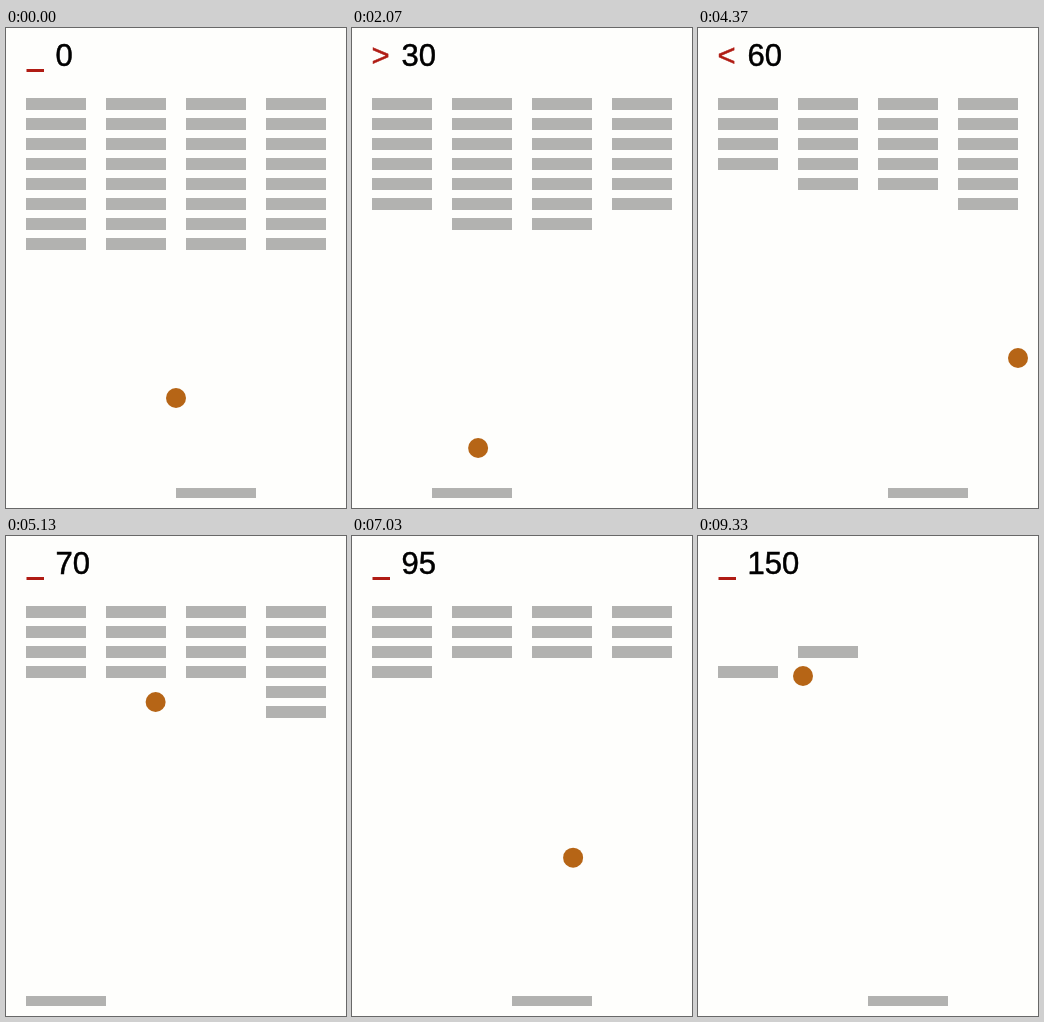
An HTML page with a canvas for the animation above (9.36 s loop, 340 by 480 pixels).

```html
<!DOCTYPE html>
<html lang="en">
<head>
<meta charset="utf-8">
<title>Brick game</title>
<style>
  html, body { margin: 0; width: 100%; height: 100%; overflow: hidden; background: #fefefc; }
  canvas { display: block; }
</style>
</head>
<body>
<canvas id="stage" width="340" height="480"></canvas>
<script>
const LOOP = 9360, FPS = 30, FRAMES = 281;
const FLOOR = 450, TOP = 20, COLS = 4, ROWS = 8;
const ctx = document.getElementById('stage').getContext('2d');

// Each rally: its frames, then the points where the ball turns (y defaults to the paddle).
const rallies = [
  [0, 37, [[170, 370], [210], [285, 225], [270], [50, 225], [300], [20, 285]]],
  [37, 87, [[20, 285], [88, 210], [160], [252, 210], [120], [175, 180], [190], [66, 180], [102, 225]]],
  [87, 131, [[102, 225], [140], [150, 180], [150], [60, 165], [260], [320, 330]]],
  [131, 176, [[320, 330], [215, 165], [130], [150, 165], [40], [130, 150], [40, 270]]],
  [176, 247, [[40, 270], [170], [285, 180], [270], [251, 140], [200], [275, TOP],
    [240, 64], [212, TOP], [186, 84], [160, TOP], [137, 64], [113, TOP], [86, 64],
    [62, TOP], [40, 84], [30, TOP], [70, 104], [104, TOP]]],
  [247, 280, [[104, TOP], [130, 84], [155, TOP], [195, 104], [230, TOP], [130], [105, 140]]]
];

// Vertical speed is constant within a rally, so times follow from the heights.
const path = [];
for (const [start, end, pts] of rallies) {
  const turns = pts.map(([x, y = FLOOR]) => ({ x, y, dist: 0 }));
  for (let i = 1; i < turns.length; i++) {
    turns[i].dist = turns[i - 1].dist + Math.abs(turns[i].y - turns[i - 1].y);
  }
  const speed = (end - start) / turns[turns.length - 1].dist;
  for (const { x, y, dist } of turns) path.push({ n: start + dist * speed, x, y });
}
const landings = path.filter(p => p.y === FLOOR);

function ballAt(n) {
  const i = Math.max(1, path.findIndex(p => p.n > n));
  const a = path[i - 1], b = path[i];
  if (n >= path[path.length - 1].n) return path[path.length - 1];
  const k = (n - a.n) / (b.n - a.n);
  return { x: a.x + (b.x - a.x) * k, y: a.y + (b.y - a.y) * k };
}

// The ball is as wide as the gaps, so it always touches exactly one column.
const brickY = row => 70 + row * 20;
const goneAt = Array.from({ length: COLS }, () => Array(ROWS).fill(Infinity));
for (let n = 0; n < FRAMES - 1; n += 0.02) {
  const { x, y } = ballAt(n);
  const col = goneAt[Math.min(COLS - 1, Math.floor((x - 10) / 80))];
  for (let r = 0; r < ROWS; r++) {
    if (Math.abs(y - brickY(r) - 6) < 16) col[r] = Math.min(col[r], n);
  }
}

// While the ball is below the bricks, the paddle heads for the next landing.
const paddle = [];
for (let n = 0, x = 170; n < FRAMES; n++) {
  const gap = (landings.find(p => p.n > n) || landings[0]).x - 40 - x;
  const dir = ballAt(n).y > 200 && Math.abs(gap) >= 10 ? Math.sign(gap) : 0;
  paddle.push({ x, dir });
  x += 10 * dir;
}

function label(text, x, color) {
  ctx.fillStyle = ctx.strokeStyle = color;
  ctx.fillText(text, x, 38);
  ctx.strokeText(text, x, 38);
}

function draw(n) {
  ctx.fillStyle = '#fefefc';
  ctx.fillRect(0, 0, 340, 480);

  ctx.fillStyle = '#b2b2b0';
  let score = 0;
  goneAt.forEach((col, c) => col.forEach((gone, r) => {
    if (gone <= n) score += 5;
    else ctx.fillRect(20 + c * 80, brickY(r), 60, 12);
  }));

  const { x, dir } = paddle[n];
  ctx.fillRect(x, 460, 80, 10);

  ctx.font = '31px "Liberation Sans", Arial, sans-serif';
  ctx.lineWidth = 0.5;
  label(score, 49.5, '#000');
  if (dir) {
    label(dir < 0 ? '<' : '>', 19.5, '#b01c14');
  } else {
    ctx.fillStyle = '#b01c14';
    ctx.fillRect(20.5, 41, 17.5, 3);
  }

  const ball = ballAt(n);
  ctx.fillStyle = '#b66516';
  ctx.beginPath();
  ctx.arc(ball.x, ball.y, 10, 0, Math.PI * 2);
  ctx.fill();
}

const t0 = performance.now();
function tick() {
  const t = (performance.now() - t0) % LOOP;
  draw(Math.min(FRAMES - 1, Math.floor((t + 4) * FPS / 1000)));
  requestAnimationFrame(tick);
}
tick();
</script>
</body>
</html>
```
